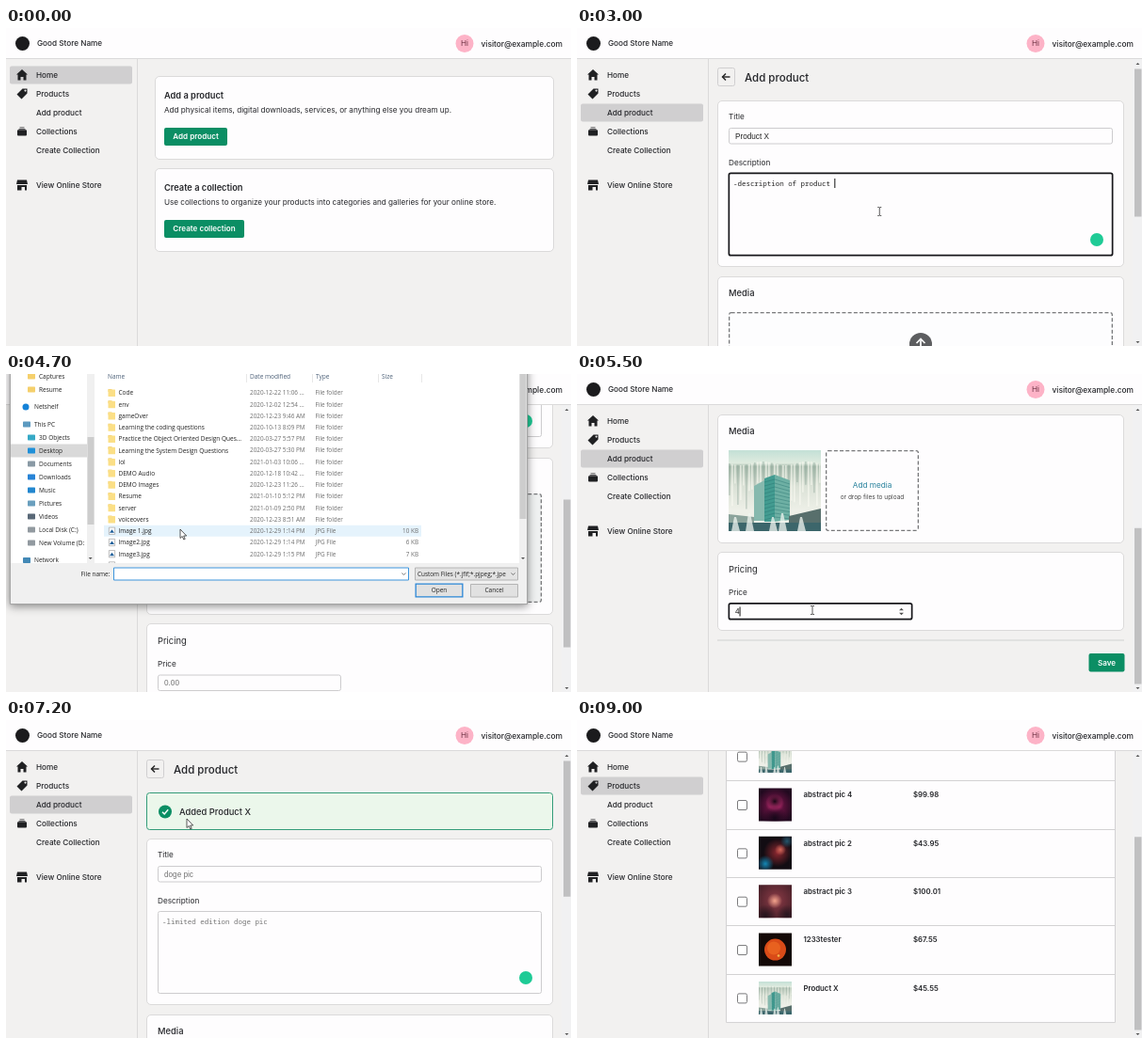
An HTML page with a canvas that plays this animation: 600x338 px, repeating every 9.1 s.

```html
<!DOCTYPE html>
<html lang="en">
<head>
<meta charset="utf-8">
<title>Store admin</title>
<style>
html, body { margin: 0; width: 100%; height: 100%; overflow: hidden; background: #f2f1f0; }
canvas { display: block; width: 100vw; height: 100vh; }
</style>
</head>
<body>
<canvas id="stage"></canvas>
<script>
const LOOP = 9100, STEP = 100, W = 600, H = 338;
const canvas = document.getElementById('stage');
const ctx = canvas.getContext('2d');
const density = window.devicePixelRatio || 1;
canvas.width = W * density;
canvas.height = H * density;

const INTER = 'Inter, sans-serif';
const ARIAL = '"Liberation Sans", Arial, sans-serif';
const MONO = '"Noto Sans Mono", monospace';
const DIALOG = '"Open Sans", sans-serif';
const INK = '#25262a', GREEN = '#0b8e64', LINE = '#dbdada', GREY = '#757575';

const ICONS = {
  home: 'M6 0L12 5.5H10.5V11.5H7.5V8H4.5V11.5H1.5V5.5H0Z',
  tag: 'M6.5 .5H11.5V5.5L5.5 11.5L.5 6.5ZM9.5 1.5a1 1 0 1 0 .01 0Z',
  stack: 'M3.5 1.5H8.5V2.3H3.5ZM2.5 3H9.5V3.8H2.5ZM2 4.3H10Q11 4.3 11 5.3V9.5Q11 10.5 10 10.5H2Q1 10.5 1 9.5V5.3Q1 4.3 2 4.3Z',
  store: 'M1 .5H11L12 5H0ZM1 6H11V11.5H9V8H5.5V11.5H1Z'
};
const CURSORS = {
  arrow: 'M0 0V9.5L2.2 7.5L3.8 11L5.2 10.4L3.7 7H6.7Z',
  hand: 'M0 0C.9 0 1.3.5 1.3 1.2V4.5L4.9 5.3C5.9 5.6 6.3 6.1 6.2 7.1L5.6 12H0L-3 7.5C-3.5 6.7-2.6 5.9-1.7 6.5L-1.2 7V1.2C-1.2.5-.8 0 0 0Z',
  beam: 'M-2-4.5H-.6L0-4L.6-4.5H2M0-4V4M-2 4.5H-.6L0 4L.6 4.5H2'
};

// time, x, y, cursor shape from this moment on
const POINTER = [
  [100, 250, 280, 'arrow'], [400, 62, 92, 'hand'], [600, 62, 92, 'arrow'], [900, 260, 112, 'beam'],
  [1700, 260, 112, 'beam'], [2100, 300, 195, 'beam'], [3500, 330, 195, 'arrow'], [3800, 380, 209, 'hand'],
  [3900, 380, 209, 'hand'], [4100, 367, 192, 'hand'], [4300, 367, 192, 'arrow'], [4700, 185, 165, 'arrow'],
  [4900, 185, 165, 'arrow'], [5300, 250, 251, 'beam'], [5800, 250, 251, 'arrow'], [6200, 562, 306, 'hand'],
  [6500, 562, 306, 'arrow'], [7200, 192, 105, 'arrow'], [7400, 60, 70, 'hand'], [7600, 60, 70, 'arrow'],
  [7900, 300, 200, 'arrow'], [8300, 300, 200, 'arrow'], [8700, 540, 300, 'arrow']
];

function ramp(t, from, to) {
  const k = Math.min(1, Math.max(0, (t - from) / (to - from)));
  return k * k * (3 - 2 * k);
}

function typed(str, t, start, perStep) {
  return str.slice(0, Math.max(0, Math.floor((t - start) / STEP + 1) * perStep));
}

// y is the middle of the capitals
function text(str, x, y, { size = 8.2, weight = 400, color = INK, font = INTER, align = 'left' } = {}) {
  ctx.font = `${weight} ${size}px ${font}`;
  ctx.textAlign = align;
  ctx.fillStyle = color;
  ctx.fillText(str, x, y + size * 0.364);
  return ctx.measureText(str).width;
}

function box(x, y, w, h, { fill, stroke, r = 0, line = 1, dash = [] } = {}) {
  const inset = stroke ? line / 2 : 0;
  ctx.beginPath();
  ctx.roundRect(x + inset, y + inset, w - 2 * inset, h - 2 * inset, r);
  if (fill) { ctx.fillStyle = fill; ctx.fill(); }
  if (stroke) {
    ctx.strokeStyle = stroke;
    ctx.lineWidth = line;
    ctx.setLineDash(dash);
    ctx.stroke();
    ctx.setLineDash([]);
  }
}

function circle(x, y, r, fill) {
  ctx.beginPath();
  ctx.arc(x, y, r, 0, 7);
  ctx.fillStyle = fill;
  ctx.fill();
}

function polyline(points, color, width) {
  ctx.beginPath();
  points.forEach(([x, y]) => ctx.lineTo(x, y));
  ctx.strokeStyle = color;
  ctx.lineWidth = width;
  ctx.stroke();
}

function polygon(points, fill) {
  ctx.beginPath();
  points.forEach(([x, y]) => ctx.lineTo(x, y));
  ctx.fillStyle = fill;
  ctx.fill();
}

function triangle(x, y, dir, size = 2, color = '#505050') {
  const half = dir * size / 2;
  polygon([[x - size, y + half], [x + size, y + half], [x, y - half]], color);
}

function chevron(x, y) {
  polyline([[x - 2, y - 1], [x, y + 1], [x + 2, y - 1]], '#555', 0.8);
}

function icon(name, y) {
  ctx.save();
  ctx.translate(11, y - 6);
  ctx.fillStyle = '#202123';
  ctx.fill(new Path2D(ICONS[name]), 'evenodd');
  ctx.restore();
}

const card = (x, y, w, h) => box(x, y, w, h, { fill: '#fefdfe', stroke: LINE, r: 4.5 });

function button(label, x, y, w, h = 19) {
  box(x, y, w, h, { fill: GREEN, r: 2 });
  text(label, x + w / 2, y + h / 2, { size: 8.1, weight: 600, color: '#fff', align: 'center' });
}

function field(x, y, w, h, focused) {
  const grow = focused ? 0.5 : 0;
  box(x - grow, y - grow, w + 2 * grow, h + 2 * grow,
    { fill: '#fefdfe', stroke: focused ? '#17171b' : '#cdccce', line: focused ? 1.7 : 1, r: 2 });
}

function entry(value, hint, x, y, caret, style) {
  const width = text(value || hint, x, y, { ...style, color: value ? '#222' : GREY });
  if (caret) box(x + (value ? width : 0), y - 5, 1, 10, { fill: '#111' });
}

function frame(active) {
  box(0, 0, W, 32, { fill: '#fefdfe' });
  box(0, 32, W, 1, { fill: LINE });
  circle(17.5, 16.5, 7.5, '#1b1b1d');
  text('Good Store Name', 33, 16.5, { weight: 500 });
  circle(487, 16.5, 9.5, '#fdb3c7');
  text('Hi', 487, 16.5, { color: '#6d3344', align: 'center' });
  text('visitor@example.com', 591, 16.5, { size: 8.4, weight: 500, align: 'right' });
  box(139, 33, 1, H, { fill: LINE });
  [['Home', 50, 'home'], ['Products', 70, 'tag'], ['Add product', 90], ['Collections', 110, 'stack'],
   ['Create Collection', 130], ['View Online Store', 167, 'store']].forEach(([label, y, shape]) => {
    if (label === active) box(4, y - 9.5, 130, 19, { fill: '#d0cfd0', r: 2 });
    if (shape) icon(shape, y);
    text(label, 32, y, { weight: 500 });
  });
}

function scrollbar(scroll, content) {
  const view = 305, track = 286, thumb = track * view / content;
  box(590, 33, 10, view, { fill: '#f1f1f2' });
  box(592, 43.5 + (track - thumb) * scroll / (content - view), 7.5, thumb, { fill: '#c0c0c1' });
  triangle(595.5, 38, 1);
  triangle(595.5, 334, -1);
}

function scrolled(scroll, paint) {
  ctx.save();
  ctx.beginPath();
  ctx.rect(140, 33, 460, 305);
  ctx.clip();
  ctx.translate(0, -scroll);
  paint();
  ctx.restore();
}

function homePage() {
  const promos = [
    ['Add a product', 'Add physical items, digital downloads, services, or anything else you dream up.', 'Add product', 67],
    ['Create a collection', 'Use collections to organize your products into categories and galleries for your online store.', 'Create collection', 85]
  ];
  promos.forEach(([title, info, action, width], i) => {
    const y = 51 + 98 * i;
    card(158, y, 424, 89);
    text(title, 168, y + 21, { size: 9.25, weight: 600 });
    text(info, 168, y + 36.5, { size: 8.13 });
    button(action, 168, y + 55, width);
  });
}

// Soft stand-in for the photo of towers before a waterfall
function cityPhoto(x, y, w, h) {
  ctx.save();
  ctx.beginPath();
  ctx.rect(x, y, w, h);
  ctx.clip();
  ctx.translate(x, y);
  ctx.scale(w / 98, h / 86);
  const air = ctx.createLinearGradient(0, 0, 0, 86);
  air.addColorStop(0, '#c3e0d6');
  air.addColorStop(0.16, '#dfebdf');
  air.addColorStop(0.2, '#a9bdae');
  air.addColorStop(0.45, '#dbe2d7');
  air.addColorStop(0.75, '#eef0e8');
  box(0, 0, 98, 86, { fill: air });
  for (let i = 0; i < 33; i++) {
    const top = 14 + 2 * Math.sin(i * 0.4), length = 34 + 14 * Math.sin(i * 2.3);
    box(i * 3, top, 1.7, length, { fill: i % 3 ? 'rgba(250,250,242,.6)' : 'rgba(130,155,142,.35)' });
  }
  polygon([[27, 38], [38, 32], [38, 75], [27, 75]], '#86b9ae');
  polygon([[38, 30], [49, 26], [49, 76], [38, 76]], '#439c91');
  polygon([[49, 26], [65, 32], [65, 74], [49, 76]], '#6eb0a4');
  for (let i = 0; i < 11; i++) {
    polyline([[38, 34 + i * 4], [49, 31 + i * 4], [65, 36 + i * 3.7]], 'rgba(35,110,108,.4)', 1);
  }
  polygon([[64, 70], [98, 62], [98, 78], [64, 78]], '#586f6c');
  polygon([[0, 68], [27, 71], [27, 80], [0, 80]], '#8ba39b');
  box(0, 77, 98, 9, { fill: '#3c666b' });
  [7, 22, 47, 57, 77].forEach((cx, i) => {
    const spray = 9 + i % 2 * 4;
    polygon([[cx - 4, 86], [cx - 1, 80 - spray], [cx + 1, 80 - spray], [cx + 5, 86]], 'rgba(240,245,240,.75)');
  });
  ctx.restore();
}

function mediaCard(loaded, hover) {
  card(149, 264, 432, loaded ? 137 : 167);
  text('Media', 161, 282, { size: 9.35, weight: 500 });
  const dashed = { stroke: '#77787a', line: 1.3, dash: [4, 2.2], r: 2 };
  if (loaded) {
    cityPhoto(161, 302, 98, 86);
    box(264, 302, 99, 86, dashed);
    text('Add media', 313.5, 339, { color: '#27819c', align: 'center' });
    text('or drop files to upload', 313.5, 352, { size: 6.5, align: 'center', color: '#444' });
    return;
  }
  box(161, 302, 408, 116, { ...dashed, fill: hover ? '#eff1f1' : '#fdfdfe' });
  circle(365, 336, 12, '#5d5e60');
  polyline([[365, 342], [365, 330.5]], '#fff', 1.7);
  polyline([[360.5, 335], [365, 330.5], [369.5, 335]], '#fff', 1.7);
  box(340, 357, 50, 20, { fill: '#fefefe', stroke: '#b8b8ba', r: 2 });
  text('Add file', 365, 367, { weight: 500, align: 'center' });
  text('or drop files to upload', 365, 393, { size: 8.1, color: '#77787a', align: 'center' });
}

function addPage(t) {
  const saved = t >= 6500;
  const loaded = t >= 5000 && !saved;
  const bannerShift = saved ? 49 : 0;
  const scroll = saved ? 0 : 175 * ramp(t, 3300, 3700) + 46 * ramp(t, 5000, 5300);
  const focus = t < 900 ? '' : t < 2100 ? 'title' : t < 4200 ? 'info' : t >= 5400 && t < 6400 ? 'price' : '';
  const blink = (t - 900) % 400 < 200;
  const arial = { font: ARIAL }, mono = { font: MONO, size: 7.46 };

  scrolled(scroll, () => {
    box(149, 42, 19, 20, { stroke: '#d0cfd0', r: 2 });
    polyline([[162.5, 52], [154.5, 52]], '#222', 1.4);
    polyline([[158, 48.5], [154.5, 52], [158, 55.5]], '#222', 1.4);
    text('Add product', 178, 52.5, { size: 11.5, weight: 500 });
    if (saved) {
      box(149, 77, 432, 40, { fill: '#ebf7eb', stroke: '#339c79', r: 3 });
      circle(169, 97.5, 7, GREEN);
      polyline([[166, 97.7], [168.2, 100], [172.2, 95.2]], '#fff', 1.4);
      text('Added Product X', 184, 97.5, { size: 9.35, weight: 500 });
    }
    ctx.translate(0, bannerShift);

    card(149, 77, 432, 177);
    text('Title', 161, 94.5);
    field(161, 106, 408, 17.5, focus === 'title');
    entry(saved ? '' : typed('Product X', t, 1300, 2), 'doge pic', 168, 115,
      focus === 'title' && (blink || t >= 1300), arial);
    text('Description', 161, 143);
    field(161, 154, 408, 88, focus === 'info');
    entry(saved ? '' : typed('-description of product X', t, 2300, 3), '-limited edition doge pic', 166, 165,
      focus === 'info' && (blink || t < 3200), mono);
    if (t >= 2200) circle(552, 225, 7, '#1fcb96');

    mediaCard(loaded, t >= 3700 && t < 5000);
    if (loaded) ctx.translate(0, -30);

    card(149, 440, 432, 84);
    text('Pricing', 161, 458.5, { size: 9.35 });
    text('Price', 161, 483);
    field(161, 494.5, 195, 17.5, focus === 'price');
    entry(saved ? '' : t < 5600 ? typed('4', t, 5500, 1) : typed('45.55', t, 5600, 2), '0.00', 168, 503.5,
      focus === 'price' && (blink || t >= 5500 && t < 5900), arial);
    if (focus === 'price') {
      triangle(344.5, 501, 1, 2.4);
      triangle(344.5, 506, -1, 2.4);
    }
    box(149, 533.5, 432, 1, { fill: '#d2d1d1' });
    button('Save', 543.5, 548, 38, 19.5);
  });
  scrollbar(scroll, 556 + bannerShift - (loaded ? 30 : 0));
}

// base colour followed by soft glows: x, y, radius, colour
const ARTWORK = {
  violet: ['#21091f', [17, 19, 20, '#8b1853'], [17, 16, 10, '#d63b80'], [17, 14, 8, '#170614'], [17, 32, 13, '#160719']],
  nebula: ['#120c13', [20, 17, 15, '#8e2830'], [23, 14, 6, '#d5685a'], [7, 29, 9, '#1587b5'], [30, 5, 7, '#26566c']],
  dusk: ['#482029', [18, 16, 22, '#8c3b47'], [17, 17, 8, '#f3a48c'], [7, 33, 12, '#24141c'], [30, 32, 11, '#281720']],
  planet: ['#140907']
};

function artwork(name, x, y) {
  if (name === 'city') return cityPhoto(x, y, 35, 35);
  const [base, ...glows] = ARTWORK[name];
  ctx.save();
  ctx.translate(x, y);
  box(0, 0, 35, 35, { fill: base });
  glows.forEach(([cx, cy, r, color]) => {
    const glow = ctx.createRadialGradient(cx, cy, 0, cx, cy, r);
    glow.addColorStop(0, color);
    glow.addColorStop(1, color + '00');
    box(0, 0, 35, 35, { fill: glow });
  });
  if (name === 'planet') {
    circle(17.5, 17.5, 11.5, '#d94b18');
    circle(16, 16, 7, '#e8611f');
    circle(21, 24, 1.3, '#f5b746');
  }
  ctx.restore();
}

function productsPage(t) {
  const scroll = 120 * ramp(t, 7800, 8200);
  const pitch = 51.35, top = 81.5, bold = { size: 7.8, weight: 600 };
  const rows = [['Title', 'Price'], ['city pic', '$25.00', 'city'], ['abstract pic 4', '$99.98', 'violet'],
    ['abstract pic 2', '$43.95', 'nebula'], ['abstract pic 3', '$100.01', 'dusk'],
    ['1233tester', '$67.55', 'planet'], ['Product X', '$45.55', 'city']];
  scrolled(scroll, () => {
    text('Products', 158, 52.5, { size: 11.5, weight: 500 });
    box(158, top, 414, pitch * 7 + 1, { fill: '#fefdfe', stroke: '#d3d2d3' });
    rows.forEach(([name, price, art], i) => {
      const y = top + pitch * i, middle = y + 26.3;
      if (i) box(158, Math.round(y), 414, 1, { fill: '#d3d2d3' });
      box(170, middle - 5.5, 11, 11, { fill: '#fff', stroke: '#7b7b7d', r: 1.5 });
      if (art) artwork(art, 193, middle - 18);
      text(name, 240.5, art ? middle - 11 : middle, bold);
      text(price, 357, art ? middle - 11 : middle, bold);
    });
  });
  scrollbar(scroll, 425);
}

function fileDialog(t) {
  const style = { size: 6.5, font: DIALOG, color: '#222' };
  const muted = { ...style, size: 6.35, color: '#6d6d6d' };
  const files = [['Code', '2020-12-22 11:06 ...'], ['env', '2020-12-02 12:54 ...'], ['gameOver', '2020-12-23 9:46 AM'],
    ['Learning the coding questions', '2020-10-13 8:09 PM'], ['Practice the Object Oriented Design Ques...', '2020-03-27 5:57 PM'],
    ['Learning the System Design Questions', '2020-03-27 5:30 PM'], ['lol', '2021-01-03 10:06 ...'],
    ['DEMO Audio', '2020-12-18 10:42 ...'], ['DEMO Images', '2020-12-23 11:26 ...'], ['Resume', '2021-01-10 5:12 PM'],
    ['server', '2021-01-09 2:50 PM'], ['voiceovers', '2020-12-23 8:51 AM'], ['Image 1.jpg', '2020-12-29 1:14 PM', '10 KB'],
    ['Image2.jpg', '2020-12-29 1:14 PM', '6 KB'], ['Image3.jpg', '2020-12-29 1:15 PM', '7 KB'], ['Image4.jpg', '2020-12-29 1:15 PM', '9 KB']];
  const places = [['Captures', 2.5, '#f5d06c'], ['Resume', 16.5, '#f5d06c'], ['Netshelf', 35, '#1683d8'], ['This PC', 53.5, '#5c9ac0'],
    ['3D Objects', 67.5, '#36a9c6'], ['Desktop', 81.5, '#2090d8'], ['Documents', 95.5, '#8a9aa5'], ['Downloads', 109.5, '#2783d6'],
    ['Music', 123.5, '#2387cf'], ['Pictures', 137.5, '#6a9fbe'], ['Videos', 151.5, '#596877'], ['Local Disk (C:)', 165.5, '#929aa0'],
    ['New Volume (D:', 179.5, '#929aa0'], ['Network', 198, '#4389b6']];

  ctx.save();
  ctx.shadowColor = 'rgba(0,0,0,.45)';
  ctx.shadowBlur = 9 * density;
  ctx.shadowOffsetY = 2 * density;
  box(4, -10, 550, 255, { fill: '#f0f0f0' });
  ctx.restore();
  box(4, -10, 550, 255, { stroke: '#888', line: 0.8 });

  ctx.save();
  ctx.beginPath();
  ctx.rect(5, 0, 548, 201);
  ctx.clip();
  box(5, 0, 548, 201, { fill: '#fff' });
  places.forEach(([name, y, color]) => {
    const root = ['Netshelf', 'This PC', 'Network'].includes(name), x = root ? 30 : 35;
    if (name === 'Desktop') box(5, y - 7, 81, 14, { fill: '#d9d9d9' });
    if (name === 'Netshelf') circle(x - 9, y, 3.5, color);
    else box(x - 12, y - 3, 8, 6, { fill: color, r: 0.7 });
    text(name, x, y, style);
  });
  box(86, 0, 8, 201, { fill: '#f0f0f0' });
  box(86.5, 67, 7, 93, { fill: '#cdcdcd' });
  triangle(89.7, 196, -1);
  box(94, 0, 451, 201, { fill: '#fff' });
  [['Name', 108], ['Date modified', 259], ['Type', 329], ['Size', 399]].forEach(([name, x]) =>
    text(name, x, 3, { ...style, color: '#4b5f77' }));
  [255, 325, 395, 441].forEach(x => box(x, 0, 0.7, 9, { fill: '#ddd' }));
  files.forEach(([name, date, size], i) => {
    const y = 20 + 12.23 * i;
    if (i === 12 && t >= 4600) box(104, y - 6, 337, 12, { fill: t >= 4800 ? '#cce8ff' : '#e5f3fc' });
    if (size) {
      box(109, y - 4, 7, 8, { fill: '#fff', stroke: '#a0a0a0', line: 0.7 });
      polygon([[110, y + 2], [112.5, y - 1.5], [115, y + 2]], '#1f5f9a');
    } else {
      box(108.5, y - 4, 4, 3, { fill: '#f0cd70' });
      box(108.5, y - 3.5, 7.5, 7.5, { fill: '#fbdf86', r: 0.5 });
    }
    text(name, 119.5, y, style);
    text(date, 259, y, muted);
    text(size ? 'JPG File' : 'File folder', 328.5, y, muted);
    if (size) text(size, 438, y, { ...muted, align: 'right' });
  });
  box(545, 0, 8, 201, { fill: '#f0f0f0' });
  box(545.5, 0, 7, 154, { fill: '#cdcdcd' });
  triangle(549, 196, -1);
  ctx.restore();

  text('File name:', 110.5, 212.5, { ...style, align: 'right' });
  box(114, 205.5, 314, 14, { fill: '#fff', stroke: '#3c94dc' });
  if (t >= 4800) text('Image 1.jpg', 117, 212.5, style);
  chevron(422.5, 212.5);
  box(434, 205.5, 110, 14, { fill: '#e3e3e3', stroke: '#b4b4b4' });
  text('Custom Files (*.jfif;*.pjpeg;*.jpe', 437, 212.5, { ...style, size: 6.4 });
  chevron(538.5, 212.5);
  box(434.5, 222.5, 51, 15, { fill: '#e1e1e1', stroke: '#2a86d6', line: 1.3 });
  text('Open', 460, 230, { ...style, align: 'center' });
  box(493, 223, 51, 14.5, { fill: '#e1e1e1', stroke: '#b4b4b4' });
  text('Cancel', 518.5, 230, { ...style, align: 'center' });
}

function pointer(t) {
  const next = POINTER.findIndex(key => key[0] > t);
  if (next < 1) return;
  const [t0, x0, y0, shape] = POINTER[next - 1], [t1, x1, y1] = POINTER[next];
  const k = ramp(t, t0, t1), path = new Path2D(CURSORS[shape]);
  ctx.save();
  ctx.translate(x0 + (x1 - x0) * k, y0 + (y1 - y0) * k);
  if (shape !== 'beam') { ctx.fillStyle = '#fff'; ctx.fill(path); }
  ctx.strokeStyle = '#222';
  ctx.lineWidth = 0.75;
  ctx.stroke(path);
  ctx.restore();
}

function draw(t) {
  ctx.setTransform(density, 0, 0, density, 0, 0);
  box(0, 0, W, H, { fill: '#f2f1f0' });
  frame(t < 600 ? 'Home' : t < 7600 ? 'Add product' : 'Products');
  if (t < 600) homePage();
  else if (t < 7600) addPage(t);
  else productsPage(t);
  if (t >= 4300 && t < 4900) fileDialog(t);
  pointer(t);
}

function tick() {
  draw(Math.floor(performance.now() % LOOP / STEP) * STEP);
  requestAnimationFrame(tick);
}
tick();
</script>
</body>
</html>
```
